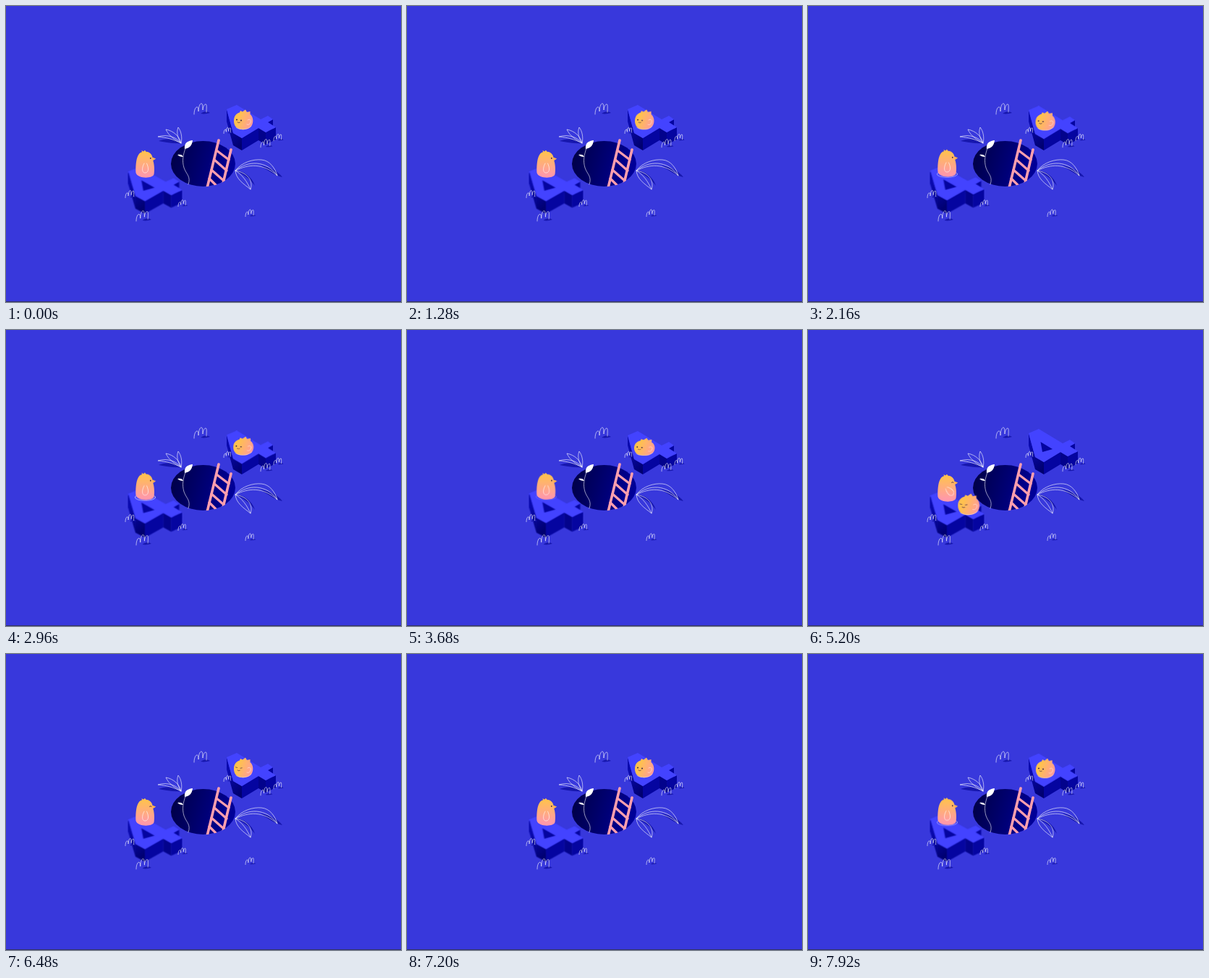
Write an HTML page that moves like this. It is 546x410 px and loops after 8000 ms.

```html
<!DOCTYPE html>
<html lang="en">
<head>
<meta charset="utf-8">
<title>404</title>
<style>
html, body { margin: 0; width: 100%; height: 100%; overflow: hidden; background: #3838dc; }
svg { display: block; width: 100vw; height: 100vh; }
.line { fill: none; stroke: #fff; stroke-width: .6; stroke-linecap: round; stroke-linejoin: round; }
.shade { fill: #1717ae; }
.ink { fill: none; stroke: #251542; stroke-width: .8; stroke-linecap: round; }
.rail { fill: none; stroke: #ff9fae; stroke-width: 3.6; stroke-linecap: round; }

#rightTop, #leftTop, #chick, #body, #ring, #wing, #cat, #squash, .open, .shut { animation: 8s linear infinite; }
#rightTop { animation-name: rise; }
#leftTop, #chick { animation-name: sink; }
#body { animation-name: stretch; transform-origin: 192px 238px; }
#ring { animation-name: ring; }
#wing { animation-name: wave; transform-origin: 193px 220px; }
#cat { animation-name: jump; }
#squash { animation-name: squash; transform-origin: 328px 171px; }
.open { animation-name: open; animation-timing-function: step-end; }
.shut { animation-name: shut; animation-timing-function: step-end; }

/* The two blocks act like a seesaw: one slowly loads, then throws the cat */
@keyframes rise {
  0%, 17% { transform: none; animation-timing-function: ease-in-out; }
  37% { transform: translateY(2.3px); }
  47.5% { transform: translateY(3px); animation-timing-function: ease-out; }
  51% { transform: translateY(-21px); animation-timing-function: ease-in-out; }
  54% { transform: translateY(-18.5px); animation-timing-function: ease-in-out; }
  62%, 95% { transform: none; animation-timing-function: ease-in-out; }
  100% { transform: translateY(.8px); }
}
@keyframes sink {
  0%, 17% { transform: none; animation-timing-function: ease-in-out; }
  37% { transform: translateY(-2.3px); }
  47.5% { transform: translateY(-3px); animation-timing-function: ease-out; }
  51% { transform: translateY(9px); animation-timing-function: ease-in-out; }
  54% { transform: translateY(8px); animation-timing-function: ease-in-out; }
  59.5% { transform: none; animation-timing-function: ease-out; }
  61.5% { transform: translateY(5px); animation-timing-function: ease-in-out; }
  65%, 95% { transform: none; animation-timing-function: ease-in-out; }
  100% { transform: translateY(-.8px); }
}
@keyframes stretch {
  0%, 44% { transform: none; animation-timing-function: ease-in; }
  49% { transform: scale(1.06, .9); }
  54% { transform: scale(1, .93); }
  58% { transform: none; }
  61.5% { transform: scale(1.03, .95); }
  65%, 100% { transform: none; }
}
@keyframes ring {
  0%, 17% { opacity: 0; }
  30%, 43% { opacity: 1; }
  47%, 94% { opacity: 0; }
  99%, 100% { opacity: .7; }
}
@keyframes wave {
  0%, 60% { transform: none; }
  63%, 67%, 71%, 75% { transform: rotate(-38deg); }
  65%, 69%, 73% { transform: rotate(-46deg); }
  77.9%, 100% { transform: none; }
}
@keyframes jump {
  0%, 17% { transform: none; animation-timing-function: ease-in-out; }
  37% { transform: translateY(2.3px); }
  47.5% { transform: translateY(3px); animation-timing-function: cubic-bezier(.2, .6, .55, 1); }
  54% { transform: translate(-74px, -82px); animation-timing-function: ease-out; }
  55.2% { transform: translate(-79px, -84px); animation-timing-function: cubic-bezier(.5, 0, .9, .7); }
  60% { transform: translate(-106px, 85px); animation-timing-function: ease-out; }
  61.5% { transform: translate(-106px, 89px); animation-timing-function: ease-in-out; }
  65%, 77.99% { transform: translate(-106px, 85px); }
  78%, 95% { transform: none; animation-timing-function: ease-in-out; }
  100% { transform: translateY(.8px); }
}
@keyframes squash {
  0%, 15% { transform: none; animation-timing-function: ease-in-out; }
  37% { transform: scale(1.06, .93); }
  46% { transform: scale(1.08, .88); animation-timing-function: ease-out; }
  50% { transform: scale(.94, 1.1); }
  54%, 57% { transform: scale(1.06, 1.06) rotate(4deg); }
  60% { transform: scale(1, 1.08); }
  61.5% { transform: scale(1.2, .88); }
  65%, 77.99% { transform: scale(1.13, 1.07); }
  78%, 96% { transform: none; }
  100% { transform: scale(1.01, .98); }
}
@keyframes open {
  0% { opacity: 1; }
  47% { opacity: 0; }
  82% { opacity: 1; }
}
@keyframes shut {
  0% { opacity: 0; }
  47% { opacity: 1; }
  82% { opacity: 0; }
}
</style>
</head>
<body>
<svg viewBox="0 0 546 410" preserveAspectRatio="none">
  <defs>
    <linearGradient id="pit" x1="0" y1=".4" x2="1" y2=".6">
      <stop offset="0" stop-color="#000048"/><stop offset="1" stop-color="#00009c"/>
    </linearGradient>
    <linearGradient id="side" gradientUnits="userSpaceOnUse" x1="304" y1="165" x2="328" y2="190">
      <stop offset="0" stop-color="#0a0aae"/><stop offset="1" stop-color="#000070"/>
    </linearGradient>
    <linearGradient id="dusk" x1="0" y1="0" x2="0" y2="1">
      <stop offset=".1" stop-color="#ffc052"/><stop offset=".9" stop-color="#ff99a8"/>
    </linearGradient>
    <linearGradient id="dawn" x1="0" y1=".3" x2="1" y2=".7">
      <stop offset=".25" stop-color="#ffc14f"/><stop offset="1" stop-color="#ff9a9e"/>
    </linearGradient>
    <clipPath id="base"></clipPath>
    <clipPath id="mouth"><path d="M220 170H330V219H317A44.5 31.5 0 0 1 228 219Z"/></clipPath>
  </defs>
  <rect width="546" height="410" fill="#3838dc"/>
  <rect y="409" width="546" height="1" fill="#333366"/>

  <!-- pit, ladder and vine -->
  <ellipse cx="272.5" cy="218.5" rx="44.5" ry="31.5" fill="url(#pit)"/>
  <g clip-path="url(#mouth)">
    <path class="rail" d="M291 200L308 213M288 213L305 228M284 227L301 242M281 239L293 251" style="stroke-width:3.2"/>
    <path class="rail" d="M294 186L278 252M311 199L299 250"/>
  </g>
  <path class="line" d="M252 247C256 236 249 233 246 224C243 214 245 206 248 197"/>
  <path d="M247 198C246 190 251 187 258 186C257 194 253 197 247 198ZM245 209C241 209 239 208 237 206C241 205 244 206 245 209Z" fill="#fff"/>

  <!-- leafy plants -->
  <path class="shade" d="M242 190C232 183 222 183 211 187C222 189 232 191 242 190ZM317 228C328 228 340 236 344 249C337 239 328 233 317 228ZM352 221C365 223 376 229 382 237C374 235 367 232 352 221Z"/>
  <path class="line" d="M242 190C236 182 224 177 210 181C222 182 232 185 242 190C240 181 232 173 221 171C225 180 233 185 242 190C244 182 242 173 238 168C235 176 238 184 242 190"/>
  <path class="line" d="M317 228C326 216 342 212 353 213C365 214 372 225 375 235C355 217 335 219 317 228C334 214 360 213 375 235M317 228C318 240 328 246 338 254C342 242 334 231 317 228C327 234 333 243 338 254"/>

  <g id="right"></g>
  <g id="left" transform="translate(169 229) scale(1.1 1.03) translate(-305 -143)"></g>
  <g id="grass"></g>

  <g id="chick">
    <ellipse id="ring" class="line" cx="192.500" cy="234" rx="14.200" ry="4.400"/>
    <g id="body">
      <path d="M179.500 231C179 220 180 204 188 202.300L187.500 200L190 201.600L192 199.800L193.500 201.800C199 202 202 206 202.500 210L207 211.500L203.200 214C205 219 205.500 227 204.500 233C203 239.500 181.500 239.500 179.500 231Z" fill="url(#dusk)"/>
      <path d="M202 209.500L207 211.500L202.800 214Z" fill="#ffb04f"/>
      <circle class="open" cx="199.800" cy="210.800" r=".9" fill="#251542"/>
      <path class="ink shut" d="M198.500 211.200q1.300-1.200 2.600 0"/>
      <path id="wing" class="line" d="M191 218C187 225 188 232 193 231C198 230 197 223 194.500 218"/>
    </g>
  </g>

  <g id="cat">
    <g id="squash">
      <path d="M315 159C315 152 319 148.500 323 147.500L324 145L327 146.500L331 143.500L333 147L337.500 146L337.500 150C341.500 153 342.500 160 340 165C336 173 321 173 317 166.500C315.500 164 315 161.500 315 159Z" fill="url(#dawn)"/>
      <path class="line" d="M334 158c3-2 5 0 4 3c-1 3-3 4-5 3" style="opacity:.75"/>
      <path class="line" d="M318 168.500C323 172 334 172 339 166.500" style="opacity:.6"/>
      <g class="open">
        <circle cx="319" cy="157.500" r=".9" fill="#251542"/>
        <circle cx="325" cy="158.500" r=".9" fill="#251542"/>
      </g>
      <path class="ink shut" style="stroke-width:.6" d="M317.500 156.800l2.200 .7M324 158.200l2.200-.4"/>
      <path class="ink" style="stroke-width:.6" d="M320 161q1.700 1.400 3.300 .3"/>
    </g>
  </g>
</svg>
<script>
const $ = id => document.getElementById(id);

// Outline of the numeral, clockwise from its upper left corner
const four = [[305,143],[319,137],[352,157],[362,152],[369,157],[362,161],
              [373,168],[359,175],[349,169],[326,183],[314,176]];
const depth = 17;
const poly = (pts, fill) => `<polygon points="${pts.join(' ')}" fill="${fill}"/>`;

const wall = (a, b, fill) => {
  const [p, q] = [four[a], four[b]];
  return poly([p, q, [q[0], q[1] + 60], [p[0], p[1] + 60]], fill);
};

// Walls hang below the moving top and are cut off along the fixed base
const low = [0, 10, 9, 8, 7, 6].map(i => [four[i][0], four[i][1] + depth]);
$('base').innerHTML = poly([[304,90], [304, 143 + depth], ...low, [374, 168 + depth], [374,90]], '#000');

for (const name of ['right', 'left']) {
  $(name).innerHTML = `<g clip-path="url(#base)"><g id="${name}Top">` +
    wall(4, 5, '#0505a0') + wall(8, 9, '#0505a0') + wall(7, 8, '#03038c') +
    wall(6, 7, '#0505a0') + wall(0, 10, 'url(#side)') + wall(10, 9, 'url(#side)') +
    poly(four, '#4343ff') + poly([[321.5,155], [338,165], [324,169]], '#0505a0') + '</g></g>';
}

// Tufts: left edge, ground line, size
const tufts = [[260,149,1], [165,265,.68], [180,297,.95], [238,277,.6],
               [352,195,.75], [370,186,.62], [301,176,.55], [331,291,.65]];
$('grass').innerHTML = tufts.map(([x, y, s]) => `
  <g transform="translate(${x} ${y}) scale(${s})">
    <path class="shade" d="M9 0C13-3 18-4 22-1C18 0 14 1 9 0Z"/>
    <path class="line" style="stroke-width:${.6 / s}" d="M0 1C0-5 2-9 4-9C6-9 6-6 6-3C6-9 8-14 10-14C12-14 12-8 12-5C12-9 14-13 16-13C18-13 17-6 17-2"/>
  </g>`).join('');
</script>
</body>
</html>
```
